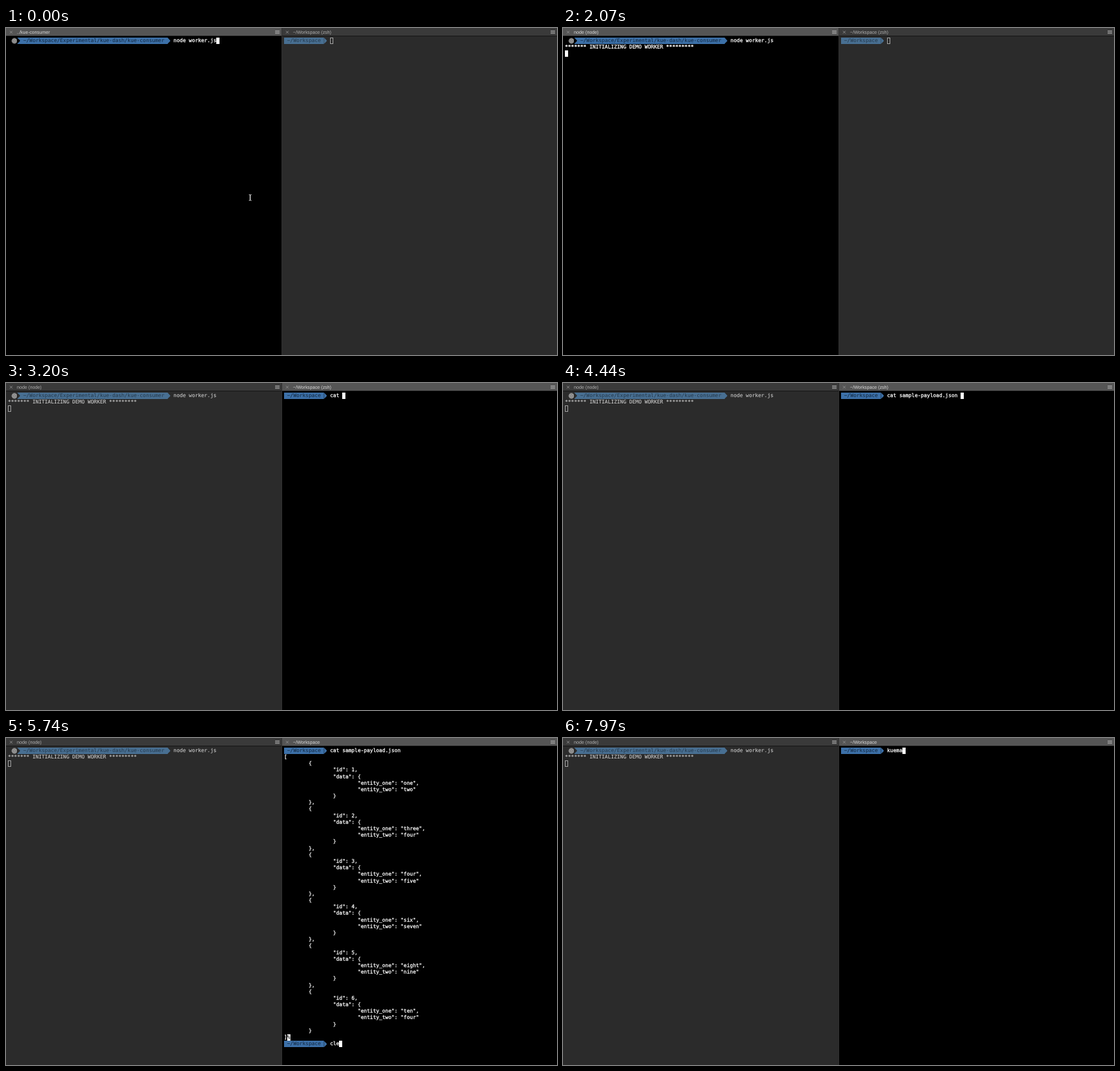
An HTML page that plays this animation: 862x511 px, repeating every 8000 ms.

```html
<!DOCTYPE html>
<html lang="en">
<head>
<meta charset="utf-8">
<title>Worker demo</title>
<style>
html, body { margin: 0; width: 100%; height: 100%; overflow: hidden; background: #000; }
#stage { position: relative; width: 862px; height: 511px; overflow: hidden; text-rendering: geometricPrecision; }
.pane {
  --bg: #2b2b2b; --bar: #3a3a3a; --title: #b2b2b2; --ink: #d0d0d0; --seg: #486f92; --path: #24384a;
  --edge: #a4a4a4; --weight: .08px;
  position: absolute; top: 0; height: 511px; overflow: hidden; background: var(--bg);
}
.pane.active {
  --bg: #000; --bar: #555; --title: #dcdcdc; --ink: #fff; --seg: #3c70a8; --path: #10253c;
  --edge: #fff; --weight: .28px;
}
#left { left: 0; width: 431px; }
#right { left: 432px; width: 430px; }
#split { position: absolute; left: 431px; top: 0; width: 1px; height: 511px; background: #303030; }
header {
  height: 12px; background: var(--bar); border-bottom: 1px solid #151515; color: var(--title);
  font: 7.2px/13px "Liberation Sans", Arial, sans-serif; white-space: pre;
}
header span { position: absolute; left: 17px; top: 0; }
header svg { position: absolute; top: 0; height: 13px; width: 12px; fill: none; stroke: #8c8c8c; }
header .close { left: 2px; }
header .menu { right: 0; stroke: #a8a8a8; }
pre {
  position: absolute; left: 3px; top: 14.8px; margin: 0; color: var(--ink); tab-size: 8;
  font: 7.973px/10.19px "DejaVu Sans Mono", monospace; -webkit-text-stroke: var(--weight) var(--ink);
}
pre i { display: inline-block; height: 10.19px; vertical-align: top; font-style: normal; }
.path { background: var(--seg); color: var(--path); -webkit-text-stroke: 0; }
.tip { width: 1ch; background: var(--seg); clip-path: polygon(0 0, 100% 50%, 0 100%); }
.notch { width: 1ch; background: var(--seg); clip-path: polygon(0 0, 100% 0, 100% 100%, 0 100%, 100% 50%); }
.gear { width: 2ch; }
.gear svg { display: block; width: 9.6px; height: 10.2px; fill: #777; stroke: #bbb; }
.cursor { width: 1ch; box-sizing: border-box; border: 1px solid var(--edge); }
.active .cursor { background: var(--edge); }
.mark { background: var(--ink); color: #000; -webkit-text-stroke: 0; }
#mouse { position: absolute; left: 378px; top: 259px; width: 8px; height: 12px; fill: none; stroke: #d8d8d8; }
</style>
</head>
<body>
<div id="stage">
  <div class="pane" id="left"></div>
  <div class="pane" id="right"></div>
  <div id="split"></div>
  <svg id="mouse" viewBox="0 0 8 12"><path d="M2 1.2Q4 1.2 4 3V9Q4 10.8 2 10.8M6 1.2Q4 1.2 4 3V9Q4 10.8 6 10.8"/></svg>
</div>
<script>
const LOOP = 8000, FOCUS = 2240;
const RUN = 900, RUN_TITLE = 930, BANNER = 1000;
const CAT = 4600, CLEAR = 7010;

// Typed text by time in ms
const catKeys = [[0, ''], [2640, 'c'], [2740, 'ca'], [2940, 'cat'], [3080, 'cat '],
  [3500, 'cat s'], [3640, 'cat sa'], [3800, 'cat sam'], [4200, 'cat sample-payload.json ']];
const clearKeys = [[0, ''], [5480, 'c'], [5620, 'cl'], [5740, 'cle'], [5880, 'clea'], [6020, 'clear']];
const kueKeys = [[0, ''], [7170, 'k'], [7670, 'kue'], [7910, 'kuem'], [7940, 'kuema']];
const typed = (keys, t) => keys.filter(k => k[0] <= t).pop()[1];

const cursor = '<i class="cursor"></i>';
const gear = '<i class="gear"><svg viewBox="0 0 9.6 10.4"><circle cx="5.2" cy="5.2" r="3.4"/>' +
  '<circle cx="5.2" cy="5.2" r="4.3" fill="none" stroke-width=".9" stroke-dasharray="1.2 1.05"/>' +
  '<circle cx="5.2" cy="5.2" r="1.2" stroke-width=".7"/></svg></i>';
const segment = path => `<i class="path"> ${path} </i><i class="tip"></i> `;
const leftPrompt = ' ' + gear + '<i class="notch"></i>' +
  segment('~/Workspace/Experimental/kue-dash/kue-consumer');
const rightPrompt = segment('~/Workspace');

const pairs = ['one two', 'three four', 'four five', 'six seven', 'eight nine', 'ten four'];
const payload = '[\n' + pairs.map((pair, n) => {
  const [a, b] = pair.split(' ');
  return `\t{\n\t\t"id": ${n + 1},\n\t\t"data": {\n\t\t\t"entity_one": "${a}",\n` +
    `\t\t\t"entity_two": "${b}"\n\t\t}\n\t}`;
}).join(',\n') + '\n]<i class="mark">%</i>\n';

function leftText(t) {
  const line = leftPrompt + 'node worker.js';
  if (t < RUN) return line + cursor;
  return line + '\n' + (t < BANNER ? '' : '******* INITIALIZING DEMO WORKER *********\n') + cursor;
}

function rightText(t) {
  if (t >= CLEAR) return rightPrompt + typed(kueKeys, t) + cursor;
  const line = rightPrompt + typed(catKeys, t);
  if (t < CAT) return line + cursor;
  return line + '\n' + payload + rightPrompt + typed(clearKeys, t) + cursor;
}

function makePane(id) {
  const el = document.getElementById(id);
  el.innerHTML = '<header><svg class="close" viewBox="0 0 12 13"><path d="M4 4.5l4 4m0-4l-4 4"/></svg><span></span>' +
    '<svg class="menu" viewBox="0 0 12 13"><path d="M2 4.5h7M2 6.5h7M2 8.5h7"/></svg></header><pre></pre>';
  const title = el.querySelector('span'), text = el.querySelector('pre');
  let last;
  return (active, name, html) => {
    const key = active + name + html;
    if (key === last) return;
    last = key;
    el.classList.toggle('active', active);
    title.textContent = name;
    text.innerHTML = html;
  };
}

const left = makePane('left'), right = makePane('right');
const mouse = document.getElementById('mouse');

function draw(t) {
  left(t < FOCUS, t < RUN_TITLE ? '../kue-consumer' : 'node (node)', leftText(t));
  right(t >= FOCUS, t < CAT ? '~/Workspace (zsh)' : '~/Workspace', rightText(t));
  mouse.style.visibility = t < RUN ? 'visible' : 'hidden';
}

const start = performance.now();
function tick() {
  draw((performance.now() - start) % LOOP);
  requestAnimationFrame(tick);
}
tick();
</script>
</body>
</html>
```
